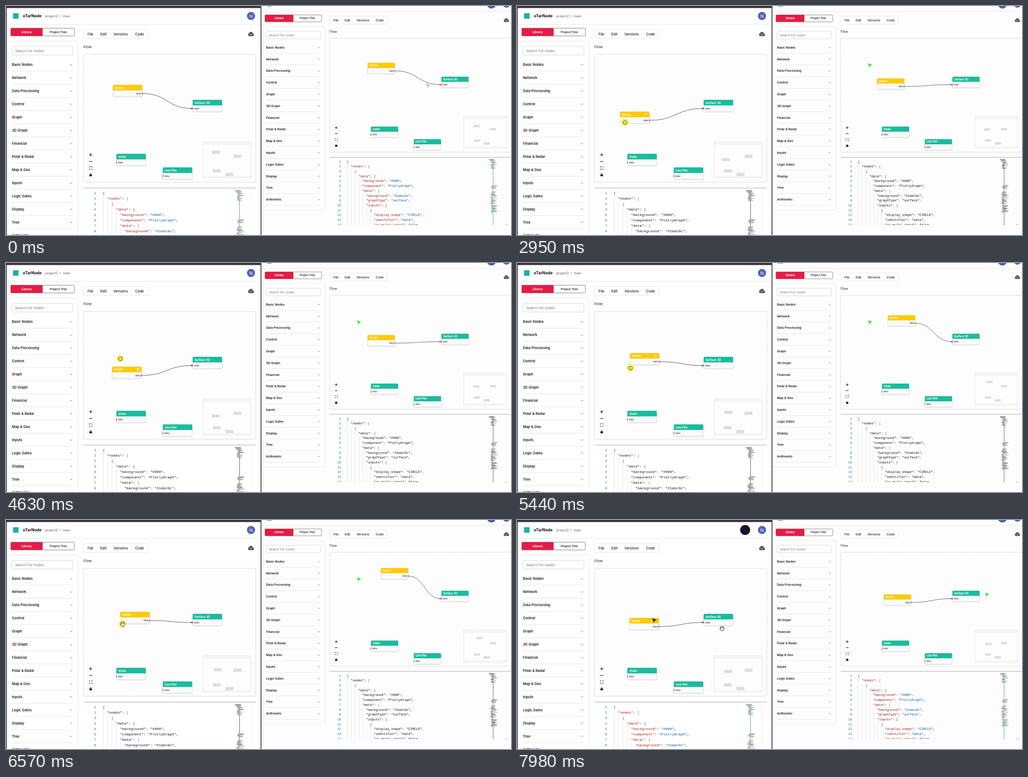
Write an HTML page with a canvas that moves like this. It is 1109 px wide and 505 px high and loops after 8000 ms.

```html
<!DOCTYPE html>
<html lang="en">
<head>
<meta charset="utf-8">
<title>Flow editor</title>
<style>
html, body { margin: 0; width: 100%; height: 100%; overflow: hidden; background: #fff; }
canvas { display: block; width: 1109px; height: 505px; }
</style>
</head>
<body>
<canvas id="stage"></canvas>
<script>
const W = 1109, H = 505, LOOP = 8000;
const canvas = document.getElementById('stage');
const ratio = window.devicePixelRatio || 1;
canvas.width = Math.round(W * ratio);
canvas.height = Math.round(H * ratio);
const c = canvas.getContext('2d');

const SANS = 'Inter, "Open Sans", sans-serif';
const MONO = '"Liberation Mono", "DejaVu Sans Mono", monospace';
const TEAL = '#1abc9c', YELLOW = '#ffcb05', RED = '#e61a46';

// Window views: chrome scale and offset, extra width, flow scale and offset, map origin and scale
const LEFT = { s: 1, x: 0, y: 0, extra: 0, fs: 1, fx: 0, fy: 0,
  mx: 452, my: 319, ms: 0.271, dark: [2180, 6900], lag: 0 };
const RIGHT = { s: 0.891, x: 559.4, y: -23.9, extra: 67.6, fs: 0.924, fx: 577.4, fy: -35.3,
  mx: 1026, my: 262, ms: 0.21, dark: [2500, 7250], lag: 380 };

const ITEMS = ['Basic Nodes', 'Network', 'Data Processing', 'Control', 'Graph', '3D Graph', 'Financial',
  'Polar & Radar', 'Map & Geo', 'Inputs', 'Logic Gates', 'Display', 'Tree', 'Arithmetic'];

const CODE = ['{', '  "nodes": [', '    {', '      "data": {', '        "background": "#000",',
  '        "component": "PlotlyGraph",', '        "data": {', '          "background": "#1abc9c",',
  '          "graphType": "surface",', '          "inputs": [', '            {',
  '              "display_shape": "CIRCLE",', '              "identifier": "data",',
  '              "is_multi_input": false,'];

// Paths as [time, x, y]
const DRAG = [[2140, 235, 174], [2300, 234, 178], [2570, 231, 211], [2950, 226.5, 233], [3110, 228, 243],
  [3490, 233, 187.5], [3740, 240, 164], [3870, 241, 164.5], [4020, 242, 171], [4500, 229, 242],
  [4800, 243, 195], [5060, 257, 163], [5150, 258, 157], [5440, 248, 198.5], [5590, 240, 218.5],
  [5690, 241, 228], [5950, 254, 190], [6190, 266.5, 153], [6570, 251, 202.5], [6720, 247, 216]];
const ARRIVE = [[710, 930, 474], [1000, 640, 430], [1250, 420, 360], [1470, 290, 255], [1640, 244, 187]];
const LEAVE = [[6800, 256, 229], [7000, 430, 215], [7150, 600, 190], [7300, 720, 200], [7800, 852, 168]];
const PEER_IN = [[1250, 923, 171], [1400, 880, 190], [1470, 842, 195], [1740, 771, 126.5]];
const PEER_OUT = [[6950, 771, 126.5], [7100, 900, 190], [7300, 1060, 172], [7420, 1028, 160.5]];

// Smooth curve through the points of a path
function track(keys, t) {
  const n = keys.length - 1;
  if (t <= keys[0][0]) return keys[0].slice(1);
  if (t >= keys[n][0]) return keys[n].slice(1);
  let i = 0;
  while (t >= keys[i + 1][0]) i++;
  const a = keys[i], b = keys[i + 1], d = b[0] - a[0], u = (t - a[0]) / d;
  const slope = (k, j) => k < 1 || k >= n ? 0
    : (keys[k + 1][j] - keys[k - 1][j]) / (keys[k + 1][0] - keys[k - 1][0]);
  const v = u * u, w = v * u;
  return [1, 2].map(j => (2 * w - 3 * v + 1) * a[j] + (3 * v - 2 * w) * b[j]
    + d * ((w - 2 * v + u) * slope(i, j) + (w - v) * slope(i + 1, j)));
}

function text(s, x, y, size, color, weight = 400, align = 'left', family = SANS) {
  c.font = `${weight} ${size}px ${family}`;
  c.fillStyle = color;
  c.textAlign = align;
  c.fillText(s, x, y);
}

function box(x, y, w, h, fill, stroke, r = 0, lw = 0.8) {
  c.beginPath();
  c.roundRect(x, y, w, h, r);
  if (fill) { c.fillStyle = fill; c.fill(); }
  if (stroke) { c.strokeStyle = stroke; c.lineWidth = lw; c.stroke(); }
}

function line(pts, color, lw = 0.8) {
  c.beginPath();
  pts.forEach(([x, y], i) => i ? c.lineTo(x, y) : c.moveTo(x, y));
  c.strokeStyle = color;
  c.lineWidth = lw;
  c.stroke();
}

function disc(x, y, r, color) {
  c.beginPath();
  c.arc(x, y, r, 0, Math.PI * 2);
  c.fillStyle = color;
  c.fill();
}

function header(v, t) {
  const e = v.extra;
  line([[2, 40.3], [558 + e, 40.3]], '#dcdcdc');
  box(15.5, 16, 12, 12, v === RIGHT && t > 2300 ? '#1583b8' : '#18b3a4');
  text('oTarNode', 37, 25.2, 8.7, '#111', 700);
  text('project2', 86, 24.6, 7.1, '#555');
  text('›', 117.5, 24.4, 8, '#555');
  text('main', 125, 24.6, 7.1, '#555');
  if (v === RIGHT) {
    disc(501 + e, 22, 11, '#35706e');
    disc(501 + e, 22, 9.2, '#5260b8');
  } else if (t > 7450) disc(501, 22, 11, '#18122b');
  disc(538 + e, 22, 9, '#5562b5');
  text('N', 538 + e, 25.5, 9.6, '#fff', 400, 'center');
}

function sidebar() {
  box(10.5, 49, 139.5, 17, '#fff', '#555', 1.5);
  box(10.5, 48.8, 70, 17.2, RED, null, 1.5);
  text('Library', 45.5, 59.6, 6.6, '#fff', 700, 'center');
  text('Project Tree', 115, 59.6, 6.5, '#222', 600, 'center');
  box(-6, 77.5, 164.5, 454.5, null, '#e0e0e0', 3);
  box(13.4, 89.4, 133.6, 18.6, '#fff', '#c8c8c8', 2);
  text('Search For nodes', 20, 101.8, 7.6, '#777');
  ITEMS.forEach((name, i) => {
    const y = 129.5 + i * 28.95;
    text(name, 13, y + 2.7, 7.6, '#1a1a1a', 600);
    line([[140.5, y - 1], [143, y + 1.3], [145.5, y - 1]], '#555', 0.8);
    line([[13, y + 14.2], [147, y + 14.2]], '#dedede');
  });
}

function toolbar(e) {
  box(170.3, 52, 141.5, 19.6, '#fff', '#e0e0e0', 2);
  [['File', 179], ['Edit', 207], ['Versions', 236], ['Code', 283.5]]
    .forEach(([s, x]) => text(s, x, 64.7, 7.6, '#1c1c1c', 500));
  text('Flow', 170, 93, 8.1, '#222');
  const x = 538 + e;
  c.fillStyle = '#555';
  c.beginPath();
  c.arc(x - 3.2, 63.2, 3.2, 0, 7);
  c.arc(x, 61, 4, 0, 7);
  c.arc(x + 3.8, 63.6, 2.8, 0, 7);
  c.rect(x - 3.2, 62, 7, 4.4);
  c.fill();
  line([[x - 2.2, 62.6], [x - 0.6, 64.2], [x + 2.4, 60.8]], '#fff', 1);
}

function panel(e) {
  box(170.3, 106.6, 378.4 + (e && e + 1), 282, '#fdfdfd', '#cfcfcf', 2);
  c.fillStyle = '#e9e9e9';
  for (let x = 177; x < 546 + e; x += 10.8)
    for (let y = 112; y < 386; y += 10.8) c.fillRect(x, y, 0.9, 0.9);
}

function node(title, x, y, color, output, icon) {
  c.shadowColor = 'rgba(0,0,0,.18)';
  c.shadowBlur = 2 * ratio;
  c.shadowOffsetY = 0.8 * ratio;
  box(x, y, 64.5, 26, '#f8fafc', null, 2);
  c.shadowColor = 'transparent';
  box(x, y, 64.5, 26, null, '#d0d4d8', 2, 0.7);
  box(x, y, 64.5, 12.2, color, null, [2, 2, 0, 0]);
  text(title, x + 4, y + 8.5, 6.2, '#fff', 700);
  if (icon) box(x + 54, y + 4, 4.5, 4.5, 'rgba(255,255,255,.55)');
  if (output) text('data', x + 61.8, y + 20.8, 5.4, '#222', 400, 'right');
  else text('data', x + 3.2, y + 20.8, 5.4, '#222');
}

function flow(v, t) {
  const [x, y] = track(DRAG, t - v.lag);
  const icon = v === LEFT ? t > 1600 && t < 6500 : t > 7700 && t < 7960;
  c.save();
  c.translate(v.fx, v.fy);
  c.scale(v.fs, v.fs);
  const sx = x + 65, sy = y + 19, ex = 408.5, ey = 226, mid = (sx + ex) / 2;
  c.beginPath();
  c.moveTo(sx, sy);
  c.bezierCurveTo(mid, sy, mid, ey, ex, ey);
  c.strokeStyle = '#444';
  c.lineWidth = 0.9;
  c.stroke();
  node('Surface 3D', 410, 207, TEAL);
  node('Violin', 242.5, 326, TEAL);
  node('Line Plot', 344.5, 356, TEAL);
  node('Vector', x, y, YELLOW, true, icon);
  const pin = (px, py, color) => box(px, py, 1.3, 5, color);
  pin(x + 63.6, y + 16.6, v === LEFT ? '#d22' : '#667');
  pin(409.5, 223.6, '#d22');
  pin(242, 342.6, '#d22');
  pin(344, 372.6, v === LEFT ? '#d22' : '#667');
  c.beginPath();
  c.moveTo(406, 224.3);
  c.lineTo(409.4, 226);
  c.lineTo(406, 227.7);
  c.fillStyle = '#222';
  c.fill();
  c.restore();
  return [x, y];
}

function overview(v, pos) {
  const ox = 431 + v.extra;
  c.save();
  c.translate(v.x, v.y);
  c.scale(v.s, v.s);
  box(ox, 298, 109, 82, '#f4f4f4');
  box(ox + 3.5, 306, 102, 69, '#fdfdfd');
  c.restore();
  const k = v === LEFT ? 0.271 : v.ms;
  [pos, [410, 207], [242.5, 326], [344.5, 356]].forEach(([x, y]) =>
    box(v.mx + (x - 235) * k, v.my + (y - 174) * (v === LEFT ? 0.27 : k), 64.5 * k, 26 * k, '#dedede'));
}

function controls() {
  box(179.5, 321, 13, 57.5, '#fff', '#f1f1f1', 1);
  line([[182.6, 328], [189.4, 328]], '#111', 1.2);
  line([[186, 324.6], [186, 331.4]], '#111', 1.2);
  line([[182.6, 342.8], [189.4, 342.8]], '#111', 1.2);
  for (const a of [-1, 1]) for (const b of [-1, 1])
    line([[186 + a * 1.2, 357.4 + b * 3], [186 + a * 3, 357.4 + b * 3], [186 + a * 3, 357.4 + b * 1.2]], '#111', 1);
  box(183.2, 371.4, 5.6, 4, '#111', null, 0.6);
  c.beginPath();
  c.arc(186, 371.2, 1.7, Math.PI, Math.PI * 2);
  c.strokeStyle = '#111';
  c.lineWidth = 1;
  c.stroke();
}

function codeMap(x0, plain) {
  let seed = 7;
  const rnd = () => (seed = (seed * 16807) % 2147483647) / 2147483647;
  const hues = ['#c26a6a', '#c26a6a', '#7d9cc4', '#55b08e'];
  for (let y = 406; y < 569; y += 1.35) {
    const narrow = y > 429 && y < 470 || y > 478 && y < 485 || y > 537;
    const a = rnd(), b = rnd(), h = hues[Math.floor(rnd() * 4)];
    if (narrow) box(x0 + 10, y, 1.6, 0.9, plain ? '#555' : '#3aa88c');
    else box(x0 + (y < 412 ? (y - 406) * 0.9 : 4 + a * 4), y, 4 + b * 11, 0.9, plain ? '#777' : h);
  }
}

function editor(v, t) {
  const e = v.extra, plain = t > v.dark[0] && t < v.dark[1], adv = 4.74;
  box(170, 400.4, 379 + e, 2.2, '#cdd0d6');
  c.save();
  c.beginPath();
  c.rect(168, 403, 400 + e, 166);
  c.clip();
  const braces = ['#0431fa', '#319331', '#7b3814'];
  CODE.forEach((src, i) => {
    const y = 414.6 + i * 12.03, indent = src.search(/\S/);
    text(String(i + 1), 198, y, 7.9, '#237893', 400, 'right', MONO);
    for (let k = 0; k < indent; k += 2)
      line([[213.5 + k * adv, y - 9], [213.5 + k * adv, y + 3]], '#d8d8d8', 0.7);
    let depth = indent / 2, key = true;
    for (const m of src.matchAll(/"[^"]*"|[{\[]|\w+|[:,]/g)) {
      let color = '#111';
      if (/[{\[]/.test(m[0])) color = braces[depth % 3];
      else if (!plain && /["\w]/.test(m[0])) color = key ? '#a31515' : '#0451a5';
      if (m[0] === ':') key = false;
      text(m[0], 212.3 + m.index * adv, y, 7.9, color, 400, 'left', MONO);
    }
  });
  codeMap(502 + (e ? 60 : 0), plain);
  c.restore();
  line([[537.5 + e, 404], [537.5 + e, 569]], '#eeeeee', 0.7);
  box(534 + e, 567.5, 8, 1, '#aaa');
}

function view(v, t) {
  c.save();
  c.translate(v.x, v.y);
  c.scale(v.s, v.s);
  header(v, t);
  sidebar();
  toolbar(v.extra);
  panel(v.extra);
  editor(v, t);
  c.restore();
  const pos = flow(v, t);
  overview(v, pos);
  c.save();
  c.translate(v.x, v.y);
  c.scale(v.s, v.s);
  controls();
  c.restore();
}

function pointer(x, y, fill, edge) {
  c.beginPath();
  [[0, 0], [9.2, 3.3], [4.9, 4.9], [3.4, 9.2]].forEach(([a, b]) => c.lineTo(x + a, y + b));
  c.closePath();
  c.lineJoin = 'round';
  c.strokeStyle = edge;
  c.lineWidth = 1.4;
  c.stroke();
  c.fillStyle = fill;
  c.fill();
}

function hand(x, y, closed) {
  c.save();
  c.translate(x, y);
  c.lineJoin = c.lineCap = 'round';
  c.beginPath();
  if (closed) {
    c.moveTo(-3.4, -1.6);
    c.bezierCurveTo(-2.6, -4, 2.6, -4, 3.8, -2);
    c.bezierCurveTo(4.4, 1, 3, 2, 2.6, 3.8);
    c.lineTo(-1.8, 3.8);
    c.bezierCurveTo(-3, 2, -4.4, 1, -3.4, -1.6);
    c.fillStyle = 'rgba(255,250,170,.6)';
  } else {
    c.moveTo(-2, 4.8);
    c.lineTo(-4.8, 0.8);
    c.quadraticCurveTo(-4.6, -0.8, -2.6, 0.8);
    c.lineTo(-3.6, -3);
    c.quadraticCurveTo(-2.8, -4.6, -1.8, -3);
    for (const [a, b] of [[-1, -4.6], [1.2, -4.4], [3.4, -3]]) {
      c.lineTo(a - 0.6, b + 0.6);
      c.quadraticCurveTo(a + 0.4, b - 1, a + 1.2, b + 0.8);
    }
    c.quadraticCurveTo(5.4, 1.6, 3, 4.8);
    c.closePath();
    c.fillStyle = '#fff';
  }
  c.fill();
  c.strokeStyle = '#222';
  c.lineWidth = 1;
  c.stroke();
  if (!closed) for (const a of [-1.2, 0.8, 2.7]) line([[a, -2.6], [a + 0.1, -0.4]], '#222', 0.7);
  c.restore();
}

function mouseAt(t) {
  if (t < 2140) return track(ARRIVE, t);
  if (t < 6800) {
    const [x, y] = track(DRAG, t + 150 * Math.min(1, (t - 2140) / 200));
    return [x + 9, y + 13];
  }
  return t < 7975 ? track(LEAVE, t) : [450, 239];
}

function cursors(t) {
  const [px, py] = track(t < 4000 ? PEER_IN : PEER_OUT, t);
  c.globalAlpha = t < 1250 ? 0.65 : 1;
  pointer(px, py, '#46d94f', '#d5f7d6');
  c.globalAlpha = 1;
  if (t > 7440) {
    const [x, y] = track(LEAVE, t - 150);
    pointer((x - RIGHT.fx) / RIGHT.fs, (y - RIGHT.fy) / RIGHT.fs - 3, '#24163a', 'rgba(90,60,60,.45)');
  }
  if (t < 710) return;
  const [x, y] = mouseAt(t);
  if (t > 2160 && t < 6800) disc(x, y, 8.4, `rgba(255,236,64,${Math.min(0.85, (6800 - t) / 200)})`);
  const inFlow = x > 170 && x < 549 && y > 106 && y < 389 || x > 711 && y > 70 && y < 322;
  if (inFlow) hand(x, y, t > 2160 && t < 6500);
  else pointer(x, y, '#fff', '#222');
}

function draw(t) {
  c.setTransform(ratio, 0, 0, ratio, 0, 0);
  c.fillStyle = '#fff';
  c.fillRect(0, 0, W, H);
  c.save();
  c.beginPath();
  c.rect(0, 0, 560, H);
  c.clip();
  view(LEFT, t);
  c.restore();
  c.save();
  c.beginPath();
  c.rect(560, 0, W - 560, H);
  c.clip();
  c.fillStyle = '#fdfdfd';
  c.fillRect(560, 0, W - 560, H);
  view(RIGHT, t);
  c.restore();
  box(0, 0, 560, 4.5, '#3a323b');
  box(0, 0, 1.5, H, '#2c282d');
  box(559, 0, 2, H, '#4a4a4a');
  cursors(t);
}

function tick() {
  draw(performance.now() % LOOP);
  requestAnimationFrame(tick);
}
tick();
</script>
</body>
</html>
```
